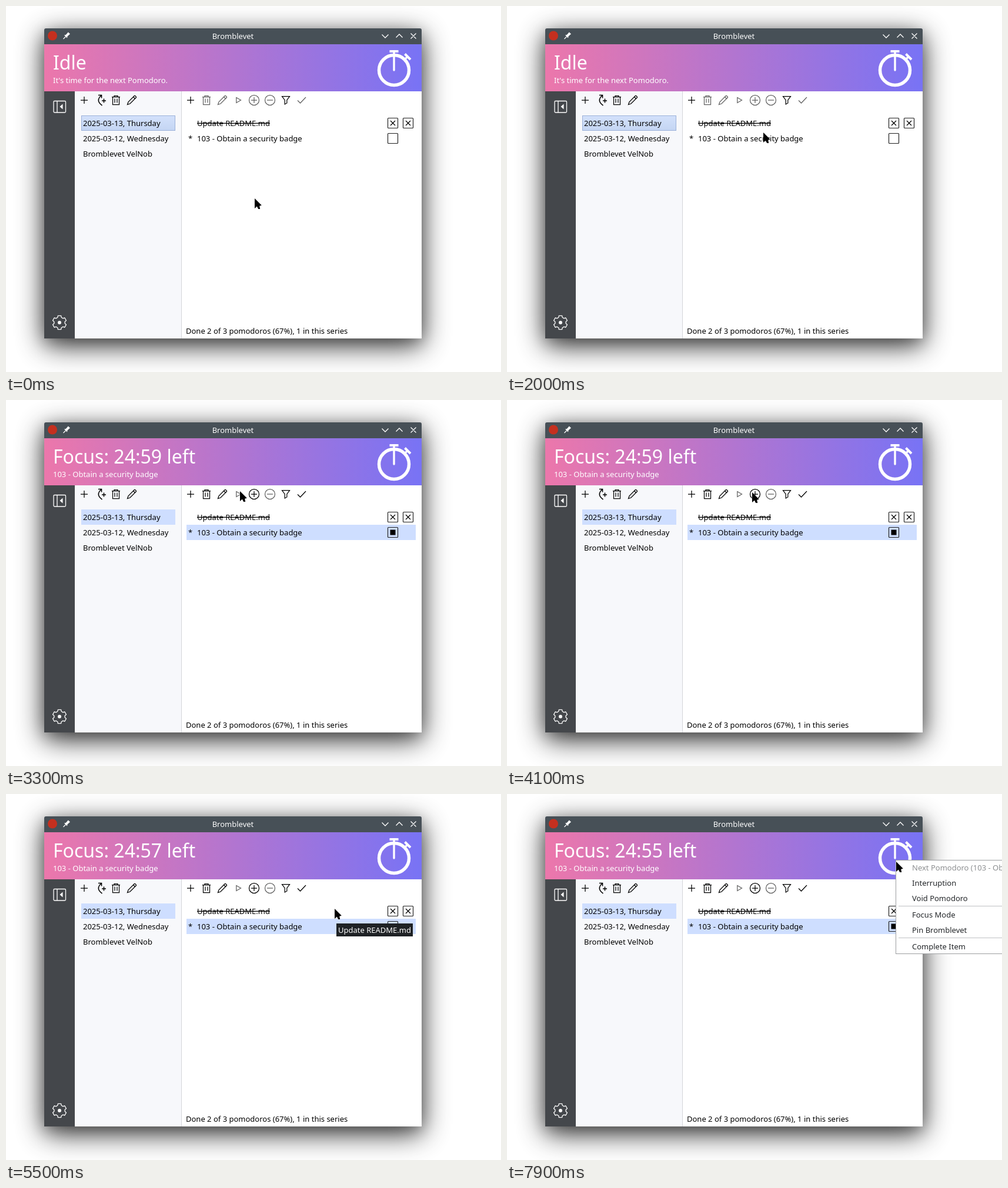
An HTML page for the animation above (8000 ms loop, 842 by 622 pixels).

```html
<!DOCTYPE html>
<html lang="en">
<head>
<meta charset="utf-8">
<title>Pomodoro window</title>
<style>
html, body { margin: 0; width: 100%; height: 100%; overflow: hidden; background: #fff; }
svg { display: block; }
text { font: 13px "Noto Sans", sans-serif; white-space: pre; }
.line { fill: none; stroke: #000; stroke-width: 1.25; }
.white { fill: none; stroke: #fff; stroke-width: 1.3; }
.dim { opacity: .62; }
</style>
</head>
<body>
<svg width="842" height="622" viewBox="0 0 842 622">
  <defs>
    <linearGradient id="head"><stop stop-color="#ec77ab"/><stop offset="1" stop-color="#7873f5"/></linearGradient>
    <linearGradient id="sel" x2="0" y2="1"><stop stop-color="#d3e1fb"/><stop offset="1" stop-color="#c4d5f3"/></linearGradient>
    <path id="plus" d="M-6 0H6M0-6V6"/>
    <path id="trash" d="M-7-5.5H7M-3-5.5V-7.5H3V-5.5M-5.5-5.5V7.5H5.5V-5.5M-2-2.5V4.5M2-2.5V4.5"/>
    <path id="pencil" d="M-7.5 7.5L-6 3L4.2-7.2Q5-8 5.8-7.2L7.2-5.8Q8-5 7.2-4.2L-3 6ZM2.5-5.5L5.5-2.5"/>
    <g id="box"><rect x="-8.5" y="-8.5" width="17" height="17" rx="1" fill="none" stroke="#222" stroke-width="1.2"/></g>
    <g id="done"><use href="#box"/><path class="line" d="M-4-4L4 4M4-4L-4 4"/></g>
  </defs>

  <rect width="842" height="622" fill="#fff"/>
  <rect x="65" y="50" width="642" height="527" opacity=".8" style="filter:blur(24px)"/>
  <rect x="65" y="44" width="642" height="527" opacity=".2" style="filter:blur(12px)"/>

  <!-- window and title bar -->
  <path d="M65 66V41Q65 38 68 38H704Q707 38 707 41V66Z" fill="#475057"/>
  <circle cx="79" cy="50.5" r="8" fill="#c5301f"/>
  <path d="M97.5 56L101.5 52" class="white"/>
  <path d="M99 49.5L104 54.5L104.5 51.5L109 47.5L105.800 44.500L101.800 49Z" fill="#fff"/>
  <text x="386" y="56" text-anchor="middle" fill="#fcfcfc">Bromblevet</text>
  <path class="white" d="M639.500 48.500L645 54L650.500 48.500M663.500 53.500L669 48L674.500 53.500M688.500 46.500L697.500 55.500M697.500 46.500L688.500 55.500"/>

  <rect x="65" y="65" width="642" height="80" fill="url(#head)"/>
  <text id="state" x="80" y="108" fill="#fff" style="font-size:32px"></text>
  <text id="sub" x="80" y="131" fill="#fff"></text>
  <g fill="none" stroke="#fff">
    <circle cx="660" cy="109" r="25.500" stroke-width="5.500"/>
    <path d="M652.500 77H667.500M678.500 81.500L688 91" stroke-width="4"/>
    <path d="M660 77V109M683 86L678.500 90.500" stroke-width="3.400" stroke-linecap="round"/>
  </g>

  <rect x="65" y="145" width="52" height="420" fill="#44474b"/>
  <rect x="117" y="145" width="181" height="420" fill="#f7f8fb"/>
  <rect x="298" y="145" width="409" height="420" fill="#fff"/>
  <path d="M298.500 145V565" stroke="#d3d6da"/>

  <rect class="white" x="81" y="161.500" width="20.500" height="19.500" rx="1.500"/>
  <path class="white" d="M87 161.500V181"/>
  <path d="M96.500 166.500V175.500L91.500 171Z" fill="#fff"/>
  <path id="gear" class="white" stroke-linejoin="round"/>
  <circle cx="91" cy="538" r="3" fill="#fff"/>

  <!-- tool buttons -->
  <g class="line">
    <use href="#plus" x="133" y="160"/>
    <path d="M157 151.500H162.500V156.500M162 152Q152 161 163.500 169" stroke-width="1.600"/>
    <path d="M163 161H170M166.500 157.500V164.500" stroke-width="1.500"/>
    <use href="#trash" x="187" y="160"/>
    <use href="#pencil" x="214" y="160"/>
    <use href="#plus" x="314" y="160"/>
    <g class="item">
      <use href="#trash" x="341" y="160"/>
      <use href="#pencil" x="368" y="160"/>
      <circle cx="422" cy="160" r="8.500"/><path d="M417 160H427M422 155V165"/>
      <path d="M496 160.500L500.500 165L510 155"/>
    </g>
    <g class="run">
      <path d="M391.800 155.500V164.500L399.500 160Z"/>
      <circle cx="449" cy="160" r="8.500"/><path d="M444 160H454"/>
    </g>
    <path d="M469.500 153.500H482.500L477.800 160V165L474.200 167V160Z"/>
  </g>

  <!-- lists -->
  <rect id="bright" x="128.500" y="186.500" width="159" height="25" fill="url(#sel)" stroke="#9bb1d9"/>
  <g id="flat" fill="#cedeff">
    <rect x="128" y="186" width="160" height="26"/>
    <rect x="307" y="212" width="390" height="26"/>
  </g>
  <text x="131" y="204">2025-03-13, Thursday</text>
  <text x="131" y="230">2025-03-12, Wednesday</text>
  <text x="131" y="256">Bromblevet VelNob</text>
  <text x="325" y="204" text-decoration="line-through">Update README.md</text>
  <text x="310" y="230">*</text>
  <text x="325" y="230">103 - Obtain a security badge</text>
  <use href="#done" x="658" y="199"/>
  <use href="#done" x="684" y="199"/>
  <use href="#box" x="658" y="225"/>
  <rect id="fill" x="653.500" y="220.500" width="9" height="9"/>
  <text x="306" y="557">Done 2 of 3 pomodoros (67%), 1 in this series</text>

  <g id="tip">
    <rect x="562" y="220" width="130" height="22" fill="#1f2225"/>
    <text x="565" y="236" fill="#fcfcfc">Update README.md</text>
  </g>

  <g id="menu" fill="#232629">
    <rect x="661.500" y="112.500" width="260" height="159" fill="#fff" stroke="#9c9ea0"/>
    <text x="689" y="130" fill="#8d8f91">Next Pomodoro (103 - Obtain a security badge)</text>
    <text x="689" y="156">Interruption</text>
    <text x="689" y="182">Void Pomodoro</text>
    <path d="M666 190.500H842M666 244.500H842" stroke="#bfc1c3"/>
    <text x="689" y="210">Focus Mode</text>
    <text x="689" y="236">Pin Bromblevet</text>
    <text x="689" y="264">Complete Item</text>
  </g>

  <path id="mouse" d="M0 0V17L3.800 13.600L6.200 18H9.200L8.200 12.800L11.800 11.800Z" stroke="#fff" stroke-width=".8" paint-order="stroke"/>
</svg>
<script>
const LOOP = 8000, STEP = 100;
const SELECT = 2400, START = 3300;
const $ = id => document.getElementById(id);
const show = (id, on) => $(id).setAttribute('visibility', on ? 'visible' : 'hidden');
const dim = (name, on) => document.querySelector('.' + name).classList.toggle('dim', on);

// pointer waypoints: time, x, y
const route = [
  [1300, 423, 327], [1600, 428, 262], [1800, 433, 224], [1900, 433, 224],
  [2000, 436, 215], [2300, 450, 221], [2500, 452, 222], [2600, 451, 219],
  [2800, 440, 194], [3000, 398, 155], [3800, 398, 155], [4100, 417, 157],
  [4200, 435, 164], [4300, 435, 164], [4600, 516, 184], [4800, 559, 195],
  [6000, 559, 195], [6300, 628, 134], [6500, 660, 109], [7800, 660, 109],
  [7900, 662, 115]
];

function pointer(t) {
  const i = route.findIndex(p => p[0] >= t);
  if (i === 0) return route[0].slice(1);
  if (i < 0) return route[route.length - 1].slice(1);
  const [a, b] = [route[i - 1], route[i]];
  const k = (t - a[0]) / (b[0] - a[0]);
  return [1, 2].map(n => a[n] + (b[n] - a[n]) * k);
}

function gear(cx, cy) {
  const pts = [];
  for (let k = 0; k < 6; k++)
    for (const [off, r] of [[-13, 12], [13, 12], [20, 9.3], [40, 9.3]]) {
      const a = (k * 60 + off - 90) * Math.PI / 180;
      pts.push((cx + r * Math.cos(a)).toFixed(2) + ' ' + (cy + r * Math.sin(a)).toFixed(2));
    }
  return 'M' + pts.join('L') + 'Z';
}

function draw(ms) {
  const t = Math.floor(ms / STEP) * STEP;
  const picked = t >= SELECT, running = t >= START;
  const left = 59 - Math.max(0, Math.floor((t - 3400) / 1000));
  $('state').textContent = running ? `Focus: 24:${left} left` : 'Idle';
  $('sub').textContent = running ? '103 - Obtain a security badge' : "It's time for the next Pomodoro.";
  show('bright', !picked);
  show('flat', picked);
  show('fill', running);
  show('tip', t >= 5500 && t < 6100);
  show('menu', t >= 7200);
  dim('item', !picked);
  dim('run', !picked || running);
  $('mouse').setAttribute('transform', `translate(${pointer(t)})`);
}

$('gear').setAttribute('d', gear(91, 538));
const began = performance.now();
function tick() {
  draw((performance.now() - began) % LOOP);
  requestAnimationFrame(tick);
}
tick();
</script>
</body>
</html>
```
